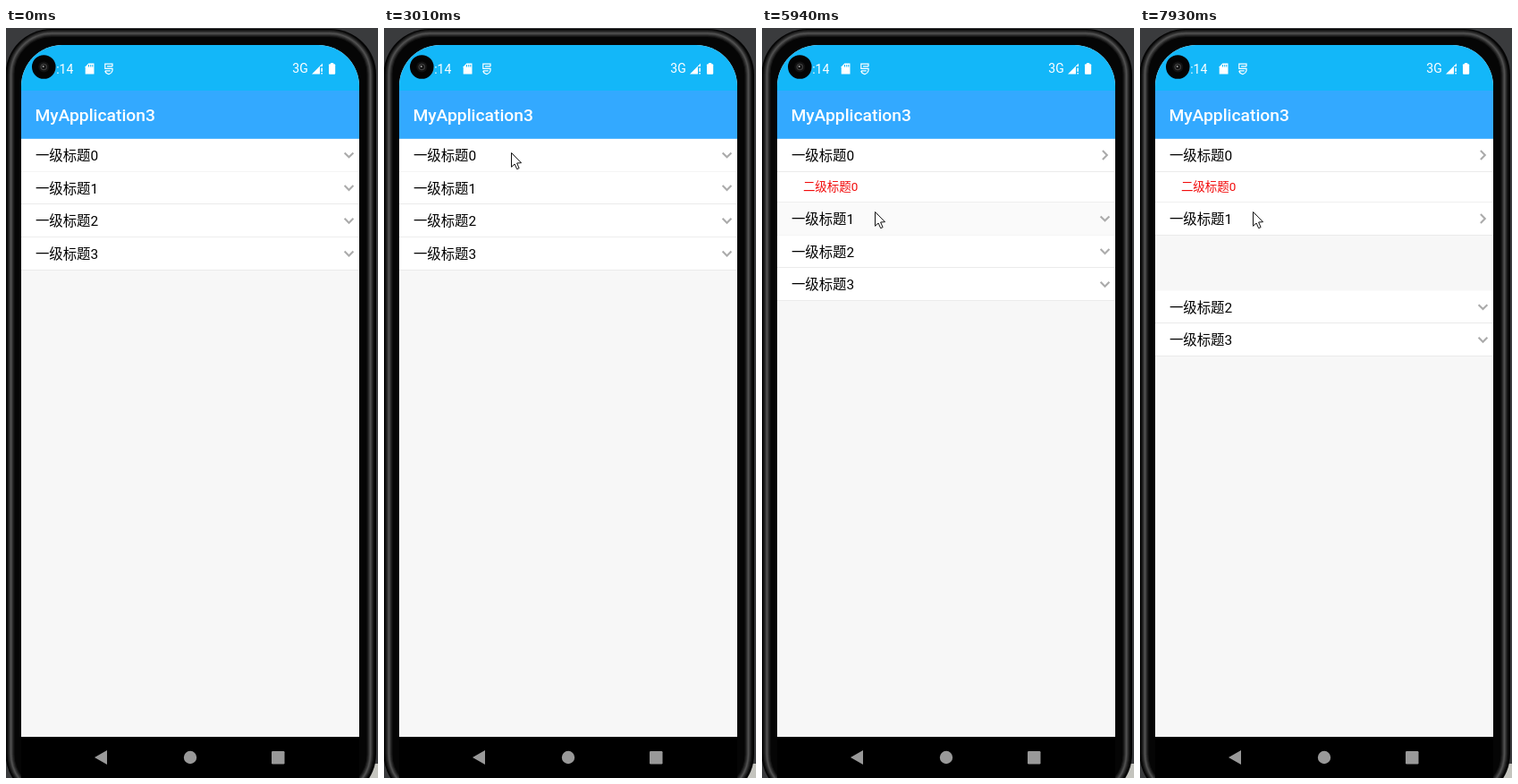
Write an HTML page with a canvas that moves like this. It is 416 px wide and 838 px high and loops after 8 s.

```html
<!DOCTYPE html>
<html lang="zh-CN">
<head>
<meta charset="utf-8">
<title>MyApplication3</title>
<style>
html, body { margin: 0; width: 100%; height: 100%; overflow: hidden; background: #000; }
canvas { display: block; width: 416px; height: 838px; }
</style>
</head>
<body>
<canvas id="stage" width="416" height="838"></canvas>
<script>
const W = 416, H = 838, LOOP = 8000, LAST_CHANGE = 7930;
const ctx = document.getElementById('stage').getContext('2d');
const FONT = 'Roboto, "Noto Sans CJK SC", "Noto Sans CJK", sans-serif';
const LEFT = 17, TOP = 123.8, GROUP_H = 36.7, CHILD_H = 34.3;

// Each group toggles at these times, starting closed.
const GROUPS = [
  { children: 1, toggles: [1700, 2530, 3480] },
  { children: 2, toggles: [6180, 7130, 7730] },
  { children: 0, toggles: [] },
  { children: 0, toggles: [] }
];
// [row, start, end, strength]
const PRESSES = [
  ['g0', 1500, 1740, 1], ['g0', 2330, 2570, 1], ['g0', 3290, 3500, 0.2],
  ['g0c0', 4860, 5015, 1],
  ['g1', 5930, 6135, 1], ['g1', 6820, 7150, 1], ['g1', 7650, 7760, 0.2]
];
// [start, end, x0, y0, x1, y1]
const MOVES = [
  [60, 850, 406, 812, 143, 157],
  [880, 1250, 143, 157, 142, 139],
  [4170, 4620, 142, 139, 127, 179],
  [5310, 5740, 127, 179, 126, 205]
];

const clamp = v => Math.max(0, Math.min(1, v));
const smooth = v => (1 - Math.cos(Math.PI * clamp(v))) / 2;
const decel = v => 1 - (1 - clamp(v)) ** 2;

function rect(c, x, y, w, h, color) {
  c.fillStyle = color;
  c.fillRect(x, y, w, h);
}

function round(c, x, y, w, h, r, fill, stroke, lw = 1) {
  c.beginPath();
  c.roundRect(x, y, w, h, r);
  if (fill) { c.fillStyle = fill; c.fill(); }
  if (stroke) { c.strokeStyle = stroke; c.lineWidth = lw; c.stroke(); }
}

function disc(c, x, y, r, color) {
  c.beginPath();
  c.arc(x, y, r, 0, Math.PI * 2);
  c.fillStyle = color;
  c.fill();
}

function trace(c, pts, close) {
  c.beginPath();
  pts.forEach(([x, y], i) => i ? c.lineTo(x, y) : c.moveTo(x, y));
  if (close) c.closePath();
}

function poly(c, pts, color) {
  trace(c, pts, true);
  c.fillStyle = color;
  c.fill();
}

function text(c, s, x, y, size, color, weight = 400) {
  c.font = `${weight} ${size}px ${FONT}`;
  c.fillStyle = color;
  c.fillText(s, x, y);
}

function drawBody(c) {
  rect(c, 0, 0, W, H, '#3a3b3d');
  rect(c, 404, 822, 12, 16, '#c4c4be');
  round(c, -0.5, 1, 414.5, 861, 51, '#050505');
  // Soft metal rim, brightest along its middle
  for (const [lw, color] of [[8, '#161616'], [5.5, '#282828'], [3.5, '#3a3a3a'], [1.5, '#505050']])
    round(c, 5.5, 6, 402, 851, 46, null, color, lw);
}

function drawStatusBar(c) {
  rect(c, LEFT, 19, 378, 51, '#13b7f9');
  rect(c, LEFT, 70, 378, 54, '#33a9ff');
  text(c, '9:14', 48.3, 50.7, 14, '#fff');
  text(c, '3G', 320.3, 50.3, 14, '#fff');
  text(c, 'MyApplication3', 32.4, 104.2, 19.25, '#fff', 500);

  // Memory card
  poly(c, [[92.3, 39.5], [98.5, 39.5], [98.5, 51.5], [88.7, 51.5], [88.7, 43.2]], '#fff');
  for (const x of [92, 94.2, 96.3]) rect(c, x, 41, 1, 2.5, '#13b7f9');

  // Shield
  c.strokeStyle = '#fff';
  c.lineWidth = 1.2;
  c.beginPath();
  c.moveTo(119, 43);
  c.lineTo(119, 40.2);
  c.lineTo(110.8, 40.2);
  c.lineTo(110.8, 45.3);
  c.lineTo(119, 45.3);
  c.lineTo(119, 47.5);
  c.quadraticCurveTo(118.4, 50.6, 114.9, 51.6);
  c.quadraticCurveTo(111.4, 50.6, 110.8, 47.8);
  c.moveTo(113, 42.8);
  c.lineTo(119, 42.8);
  c.moveTo(110.8, 47.8);
  c.lineTo(116.8, 47.8);
  c.stroke();

  // Signal and battery
  poly(c, [[342, 51.5], [354, 39.5], [354, 43], [351, 43], [351, 51.5]], '#fff');
  rect(c, 352.4, 44.5, 1.5, 4.4, '#fff');
  rect(c, 352.4, 50, 1.5, 1.5, '#fff');
  round(c, 361, 40.2, 7.2, 11.5, 1, '#fff');
  rect(c, 363, 39, 3.2, 2, '#fff');

  // Camera
  disc(c, 42.3, 43.5, 13.3, '#040404');
  disc(c, 42.3, 43.5, 6, '#121212');
  disc(c, 42.3, 43.5, 3.8, '#3d3d3d');
  disc(c, 42.3, 43.5, 2.5, '#111');
  disc(c, 41.7, 42.9, 1, '#a5a5a5');
}

function drawNav(c) {
  rect(c, LEFT, 792, 378, 46, '#000');
  poly(c, [[99, 815], [113, 807], [113, 823]], '#999');
  disc(c, 206, 815, 7.2, '#999');
  round(c, 297, 808, 14.5, 14.5, 1.2, '#999');
}

function makeShell() {
  const shell = document.createElement('canvas');
  shell.width = W;
  shell.height = H;
  const c = shell.getContext('2d');
  drawBody(c);
  c.save();
  c.beginPath();
  c.roundRect(LEFT, 19, 378, 773, [46, 46, 0, 0]);
  c.clip();
  rect(c, LEFT, 19, 378, 773, '#f7f7f7');
  drawStatusBar(c);
  c.restore();
  drawNav(c);
  return shell;
}

// gap: room made for children, alpha: their opacity, turn: arrow angle
function groupState({ toggles }, t) {
  const n = toggles.filter(s => s <= t).length;
  if (!n) return { gap: 0, alpha: 0, turn: 1 };
  const d = t - toggles[n - 1];
  const spin = decel(d / 200);
  return n % 2
    ? { gap: smooth(d / 250), alpha: smooth((d - 250) / 120), turn: 1 - spin }
    : { gap: 1 - smooth((d - 120) / 250), alpha: 1 - smooth(d / 120), turn: spin };
}

function pressLevel(id, t) {
  let level = 0;
  for (const [row, a, b, k] of PRESSES)
    if (row === id) level = Math.max(level, k * Math.min(clamp((t - a) / 60), clamp((b - t) / 40)));
  return level;
}

function drawRow(id, y, h, t) {
  const shade = Math.round(255 - 30 * pressLevel(id, t));
  rect(ctx, LEFT, y, 378, h, `rgb(${shade},${shade},${shade})`);
  rect(ctx, LEFT, Math.round(y + h) - 1, 378, 1, '#ebebeb');
}

function drawArrow(y, turn) {
  ctx.save();
  ctx.translate(383.5, y);
  ctx.rotate(turn * Math.PI / 2);
  trace(ctx, [[-2.6, -4.9], [2.3, 0], [-2.6, 4.9]]);
  ctx.strokeStyle = '#ababab';
  ctx.lineWidth = 2.1;
  ctx.stroke();
  ctx.restore();
}

function drawList(t) {
  let y = TOP;
  GROUPS.forEach((group, i) => {
    const { gap, alpha, turn } = groupState(group, t);
    const childTop = y + GROUP_H;
    ctx.globalAlpha = alpha;
    for (let k = 0; alpha > 0 && k < group.children; k++) {
      const cy = childTop + k * CHILD_H;
      drawRow(`g${i}c${k}`, cy, CHILD_H, t);
      text(ctx, '二级标题' + k, 45.9, cy + 21.9, 13.475, '#f20d0d');
    }
    ctx.globalAlpha = 1;
    drawRow('g' + i, y, GROUP_H, t);
    text(ctx, '一级标题' + i, 32.9, y + 24, 15.4, '#000');
    drawArrow(y + 18.2, turn);
    y = childTop + gap * group.children * CHILD_H;
  });
}

function drawCursor(t) {
  const move = MOVES.filter(m => m[0] <= t).pop();
  if (!move || t < 70) return;
  const [a, b, x0, y0, x1, y1] = move;
  const k = smooth((t - a) / (b - a));
  ctx.save();
  ctx.translate(x0 + (x1 - x0) * k + 0.5, y0 + (y1 - y0) * k + 0.5);
  trace(ctx, [[0, 0], [0, 15.8], [3.6, 12.5], [6.2, 18.2], [8.6, 17.1], [6.1, 11.5], [11, 11.2]], true);
  ctx.fillStyle = '#fff';
  ctx.fill();
  ctx.strokeStyle = '#111';
  ctx.lineWidth = 1;
  ctx.stroke();
  ctx.restore();
}

const shell = makeShell();
const start = performance.now();

function frame() {
  const t = Math.min((performance.now() - start) % LOOP, LAST_CHANGE);
  ctx.drawImage(shell, 0, 0);
  drawList(t);
  drawCursor(t);
  requestAnimationFrame(frame);
}
frame();
</script>
</body>
</html>
```
